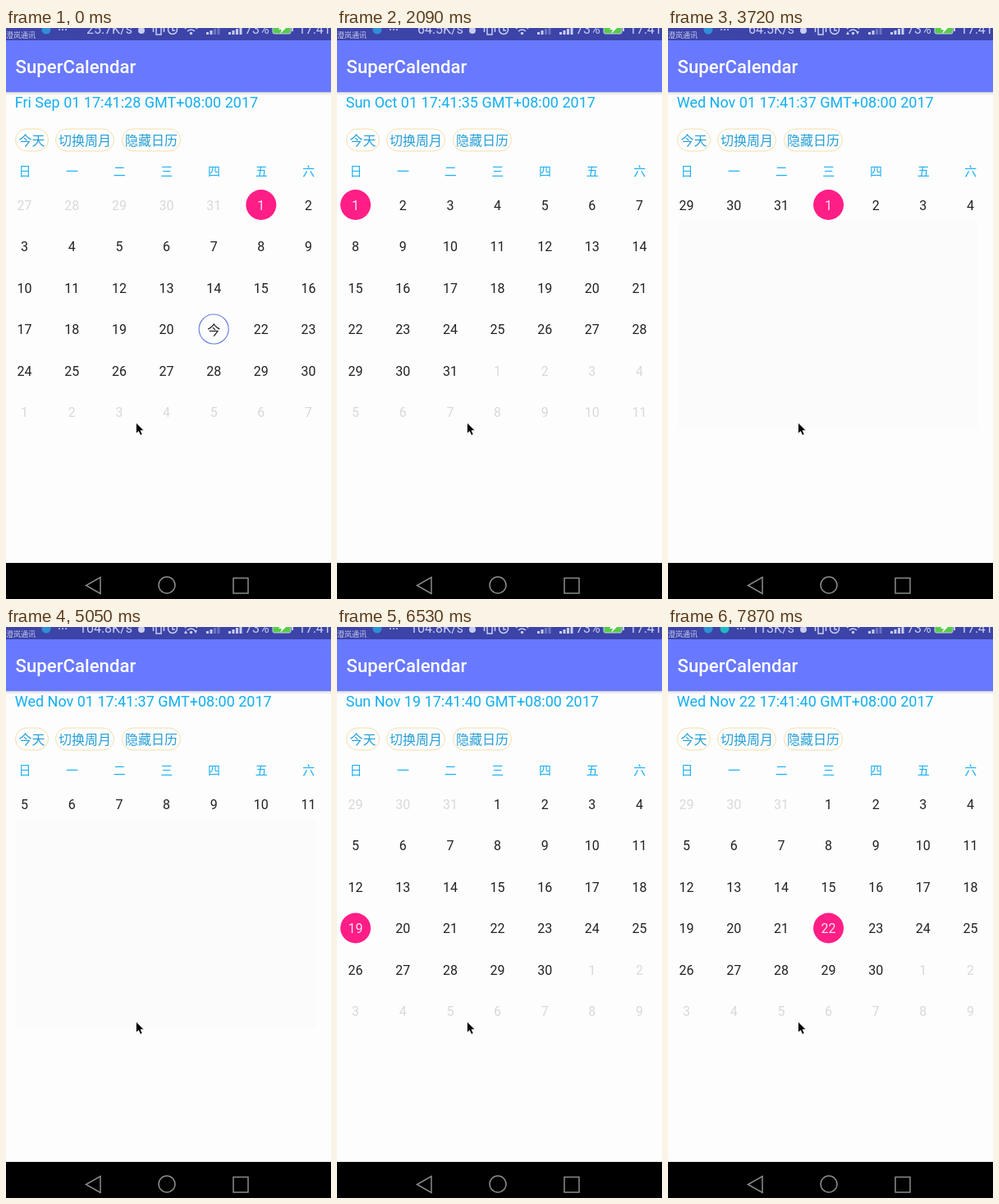
Recreate the animation shown at these times as an HTML page. Size 396 px wide and 696 px high, loop 8 s.

```html
<!DOCTYPE html>
<html lang="zh">
<head>
<meta charset="utf-8">
<title>SuperCalendar</title>
<style>
html, body { margin: 0; width: 100%; height: 100%; overflow: hidden; background: #fdfdfd; }
svg { display: block; width: 100%; height: 100%; }
text { font-family: Roboto, "Noto Sans CJK SC", "Noto Sans CJK", sans-serif; font-size: 16px; }
.mid { text-anchor: middle; }
.line { fill: none; stroke: #8c8c8c; stroke-width: 1.5; }
#weekdays text { font-size: 15px; }
#weekdays, #buttons { font-weight: 500; }
</style>
</head>
<body>
<svg id="stage" viewBox="0 0 396 696">
  <rect width="396" height="696" fill="#fdfdfd"/>
  <g id="calendar"></g>
  <g id="weekdays" fill="#1cb0f4"></g>
  <text id="date" x="10.7" y="97" fill="#12aef2" style="font-size:18px"></text>
  <g id="buttons"></g>
  <rect y="78" width="396" height="1.5" fill="#cfcfd4"/>
  <rect y="79.5" width="396" height="2" fill="#efeff1"/>
  <rect y="15" width="396" height="63" fill="#6879ff"/>
  <text x="11.6" y="55" fill="#fff" style="font-size:22.2px;font-weight:500">SuperCalendar</text>
  <rect width="396" height="15" fill="#3c44a8"/>
  <g id="status" fill="#c9cdee"></g>
  <rect y="652" width="396" height="44" fill="#000"/>
  <g class="line">
    <path d="M115 669.500V689.500L97.500 679.500Z"/>
    <circle cx="196" cy="679" r="10"/>
    <rect x="277" y="670.500" width="18" height="18.500"/>
  </g>
  <path d="M158.500 481V494.500L161.500 491.700L163.800 496.500L166.200 495.300L164 490.700H168.200Z"
        fill="#000" stroke="#fff" stroke-width=".8"/>
</svg>
<script>
const DURATION = 8000;
const byId = id => document.getElementById(id);
const columnX = i => 22.6 + 57.65 * i;
const rowY = i => 216 + 50.5 * i;
const label = (x, y, text, fill) =>
  `<text class="mid" x="${x}" y="${y}"${fill ? ` fill="${fill}"` : ''}>${text}</text>`;

// Each entry changes part of the state from its time onward.
const timeline = [
  [0, { month: 8, day: 1, selected: true, week: null, rows: 6, shift: 0,
        date: 'Fri Sep 01 17:41:28', speed: '25.7K/s', wifiActive: false, extraIcon: false }],
  [1500, { month: 9, selected: false, shift: .7 }],
  [1650, { selected: true, shift: 0, date: 'Sun Oct 01 17:41:35' }],
  [1800, { speed: '64.5K/s' }],
  [2380, { month: 10, selected: false, shift: 18 }],
  [2530, { shift: 0 }],
  [2680, { selected: true, date: 'Wed Nov 01 17:41:37' }],
  [3430, { week: 0, wifiActive: true }],
  [4760, { speed: '104.8K/s' }],
  [5050, { week: 1, selected: false }],
  [5200, { day: 5, selected: true, date: 'Sun Nov 05 17:41:38' }],
  [5340, { week: 2, selected: false }],
  [5490, { day: 12, selected: true, date: 'Sun Nov 12 17:41:38' }],
  [5940, { week: 3, selected: false }],
  [6090, { day: 19, selected: true, date: 'Sun Nov 19 17:41:40' }],
  [6380, { week: null, rows: 4, wifiActive: false }],
  [6530, { rows: 6 }],
  [6980, { day: 22, date: 'Wed Nov 22 17:41:40' }],
  [7720, { speed: '113K/s', extraIcon: true }]
];

function stateAt(time) {
  return Object.assign({}, ...timeline.filter(([start]) => start <= time).map(entry => entry[1]));
}

function drawCell(state, row, column, y) {
  const first = new Date(2017, state.month, 1).getDay();
  const cell = new Date(2017, state.month, 1 - first + row * 7 + column);
  const day = cell.getDate();
  const inMonth = cell.getMonth() === state.month;
  const x = columnX(column) + state.shift;
  if (inMonth && state.selected && day === state.day) {
    return `<circle cx="${x}" cy="${y - .5}" r="18.500" fill="#ff1e86"/>` + label(x, y + 5.7, day, '#ffe0ee');
  }
  if (inMonth && state.month === 8 && day === 21) {
    return `<circle cx="${x}" cy="${y - .5}" r="18" fill="none" stroke="#6f84de" stroke-width="1.2"/>` +
      label(x, y + 6, '今', '#222');
  }
  return label(x, y + 5.7, day, inMonth || state.week !== null ? '#222' : '#d9d9d9');
}

function drawCalendar(state) {
  const collapsed = state.week !== null;
  let html = collapsed ? '<rect x="12" y="236" width="366" height="253" fill="#fbfbfb"/>' : '';
  for (let i = 0; i < (collapsed ? 1 : state.rows); i++) {
    for (let column = 0; column < 7; column++) {
      html += drawCell(state, collapsed ? state.week : i, column, rowY(i));
    }
  }
  return html;
}

function drawStatus(state) {
  const bars = (x, opacity) => [0, 1, 2, 3].map(i =>
    `<rect x="${x + i * 4.5}" y="${5 - i * 2}" width="3" height="${3 + i * 2}" opacity="${i > 1 ? opacity : 1}"/>`).join('');
  const dotsX = state.extraIcon ? 85 : 65;
  const dots = [0, 4, 8].map(dx => `<circle cx="${dotsX + dx}" cy="2" r="1"/>`).join('');
  const extra = state.extraIcon ? '<circle cx="69" cy="2" r="5.500" fill="#1fb9c4"/>' : '';
  const arrows = state.wifiActive ? '<path d="M229 4h4l-2 4zM217 8h4l-2-4z"/>' : '';
  return `<text x="0" y="12" style="font-size:9px">澄岚通讯</text>
    <circle cx="49" cy="2" r="5.500" fill="#2f8ed6"/>${extra}${dots}
    <text x="154" y="7" text-anchor="end">${state.speed}</text>
    <circle cx="165" cy="3" r="4"/>
    <g fill="none" stroke="#c9cdee" stroke-width="1.5">
      <path d="M183 -4H189V8H183ZM179.500 -1V5M192.500 -1V5"/>
      <circle cx="203" cy="2" r="5.500"/><path d="M203 -1V3H206"/>
      <path d="M218 1Q225.500 -6 233 1M221 4Q225.500 0 230 4"/>
    </g>
    <circle cx="225.500" cy="6.500" r="1.700"/>${arrows}
    ${bars(244, .35)}${bars(271, 1)}
    <text x="291" y="7">73%</text>
    <rect x="325" y="-4" width="22" height="11" rx="2" fill="#58cb4a" stroke="#c9cdee"/>
    <rect x="348" y="-1" width="2" height="5"/>
    <path d="M337 -4L332 2H336L334 7L341 0H337Z" fill="#fff"/>
    <text x="356" y="7">17:41</text>`;
}

byId('weekdays').innerHTML = [...'日一二三四五六'].map((name, i) => label(columnX(i) + .3, 180, name)).join('');

byId('buttons').innerHTML = [[11, 41, '今天'], [60, 72, '切换周月'], [141, 72, '隐藏日历']].map(([x, width, name]) =>
  `<rect x="${x + .5}" y="123" width="${width - 1}" height="27" rx="13.500" fill="#fdfdfd" stroke="#f6dfa9"/>` +
  label(x + width / 2, 143, name, '#269fd6')).join('');

let shown = '';
function render(now) {
  const state = stateAt(now % DURATION);
  const key = JSON.stringify(state);
  if (key !== shown) {
    shown = key;
    byId('calendar').innerHTML = drawCalendar(state);
    byId('status').innerHTML = drawStatus(state);
    byId('date').textContent = state.date + ' GMT+08:00 2017';
  }
}

const begin = performance.now();
function tick() {
  render(performance.now() - begin);
  requestAnimationFrame(tick);
}
tick();
</script>
</body>
</html>
```
